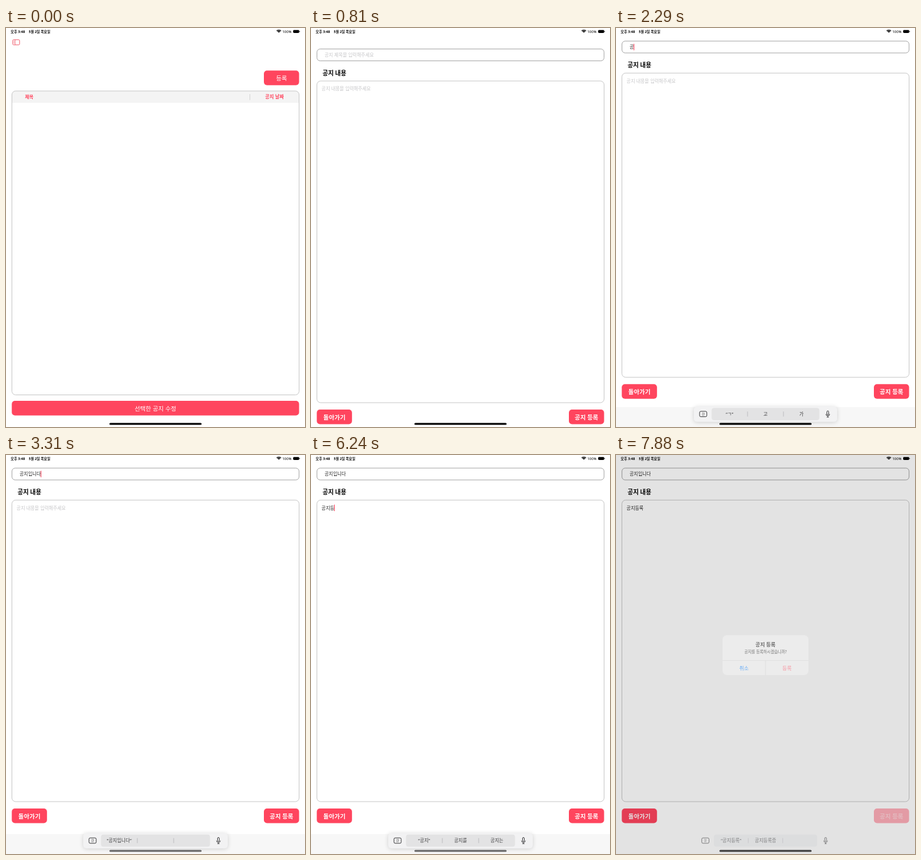
Animation, 480 px wide and 640 px high, one loop 8000 ms. Source, as an HTML page with a canvas:

```html
<!DOCTYPE html>
<html lang="ko">
<head>
<meta charset="utf-8">
<style>
  html, body { margin: 0; width: 100%; height: 100%; overflow: hidden; background: #fff; }
  canvas { display: block; }
</style>
</head>
<body>
<canvas id="stage" width="480" height="640"></canvas>
<script>
const ctx = document.getElementById('stage').getContext('2d');
const LOOP = 8000, STEP = 110, LEAD = 8;
const RED = '#ff455e', HINT = '#c6c6c8';
const FONT = '"Noto Sans", "Noto Sans CJK KR", "Noto Sans CJK", sans-serif';

const titleTyping = [[0, ''], [2080, 'ㄱ'], [2190, '고'], [2290, '공'], [2400, '공지'],
  [2510, '공지이'], [2840, '공지입'], [3000, '공지입니'], [3310, '공지입니다']];
const bodyTyping = [[0, ''], [5590, '고'], [5700, '공'], [5810, '공ㅈ'], [5930, '공지'],
  [6040, '공짇'], [6240, '공지등'], [6590, '공지등록']];
const suggestions = [[0, ''], [2290, '“ㄱ”|고|가'], [2510, '“공지”|공지를|공지는'],
  [2840, '“공지입”|공지|공지를'], [3310, '“공지입니다”'], [4920, ''], [5190, '“ㄱ”|고|가'],
  [5930, '“공지”|공지를|공지는'], [6420, '“공지등”|공지등록|공지를'], [7100, '“공지등록”|공지등록증']];
const caretAlpha = [[0, 0], [1430, 1], [3590, .5], [3710, 0], [3950, .5], [4070, 1], [4610, .5],
  [4730, 0], [4920, 1], [7100, .5], [7210, 0], [7450, .5], [7570, 1], [7880, 0]];

// Value of the last entry that has started.
const at = (t, table) => table.filter(([start]) => start <= t).pop()[1];
const held = (t, anchor) => anchor + Math.floor((t - anchor) / STEP) * STEP;
// Critically damped spring: remaining distance from 1 to 0.
const spring = (t, start) => {
  const x = Math.max(0, t - start) * .01826;
  return (1 + x) * Math.exp(-x);
};

function box(x, y, w, h, r, fill, stroke) {
  ctx.beginPath();
  ctx.roundRect(x, y, w, h, r);
  if (fill) { ctx.fillStyle = fill; ctx.fill(); }
  if (stroke) { ctx.strokeStyle = stroke; ctx.lineWidth = 1; ctx.stroke(); }
}

// y is the vertical middle of the text.
function text(str, x, y, size, color, weight = 400, align = 'left') {
  ctx.font = `${weight} ${size}px ${FONT}`;
  ctx.textAlign = align;
  ctx.fillStyle = color;
  ctx.fillText(str, x, y + size * .37);
}

function line(color, width, ...points) {
  ctx.beginPath();
  points.forEach(([x, y], i) => i ? ctx.lineTo(x, y) : ctx.moveTo(x, y));
  ctx.strokeStyle = color;
  ctx.lineWidth = width;
  ctx.stroke();
}

function faded(alpha, paint) {
  ctx.save();
  ctx.globalAlpha *= alpha;
  paint();
  ctx.restore();
}

function button(label, x, y, w, weight, alpha = 1) {
  faded(alpha, () => {
    box(x, y, w, 23.5, 5, RED);
    text(label, x + w / 2, y + 12, 9.65, '#fff', weight, 'center');
  });
}

function statusBar() {
  text('오후 3:48', 7.5, 5.5, 5.6, '#000', 600);
  text('5월 2일 목요일', 36.5, 5.5, 5.5, '#000', 600);
  text('100%', 458.5, 5.5, 5.9, '#000', 500, 'right');
  for (const r of [1.7, 3.4, 5]) {
    ctx.beginPath();
    ctx.arc(438, 8, r, -Math.PI * .75, -Math.PI * .25);
    ctx.strokeStyle = '#000';
    ctx.lineWidth = 1.2;
    ctx.stroke();
  }
  box(461, 3.2, 9.6, 4.8, 1.4, '#000');
  box(471.2, 4.8, .8, 1.6, .4, '#000');
}

function listScreen(t) {
  box(10.8, 18.8, 11, 8.2, 1.5, null, '#f0606f');
  line('#f0606f', .8, [14.6, 19], [14.6, 27]);
  for (const y of [21, 22.7, 24.4]) line('#f0606f', .6, [12, y], [13.6, y]);
  button('등록', 414, 68.3, 56.5, 400, at(t, [[0, 1], [380, .2], [490, .48]]));
  box(9.5, 101, 461, 19, [6, 6, 0, 0], '#f4f4f4');
  box(9.5, 101, 461, 487.5, 6, null, '#c8c8c8');
  text('제목', 30.5, 110.5, 7.4, RED, 700);
  line('#d4d4d4', 1, [391.5, 106], [391.5, 115.5]);
  text('공지 날짜', 431, 110.5, 7.6, RED, 700, 'center');
  button('선택한 공지 수정', 9.3, 598, 461.2, 400);
}

function input(value, hint, x, y, caret) {
  text(value || hint, x, y, 7.45, value ? '#222' : HINT);
  if (!caret) return;
  const end = value ? x + ctx.measureText(value).width : x;
  faded(caret, () => box(end - .3, y - 5.3, 1.1, 10.6, .5, RED));
}

function formScreen(t, offset, bottom) {
  const caret = at(t, caretAlpha), inBody = t >= 4920;
  ctx.save();
  ctx.translate(0, offset);
  box(0, 0, 480, 640, 0, '#fff');
  box(9.6, 21, 460.8, 19, 5, null, '#a6a6a6');
  input(at(t, titleTyping), '공지 제목을 입력해주세요', 21.7, 30.5, inBody ? 0 : caret);
  text('공지 내용', 18.5, 59.5, 9.7, '#000', 700);
  box(9.5, 72.3, 461, bottom - 72.3, 6, null, '#c8c8c8');
  input(at(t, bodyTyping), '공지 내용을 입력해주세요', 16.8, 84.8, inBody ? caret : 0);
  button('돌아가기', 9.3, bottom + 11, 56.5, 600);
  button('공지 등록', 414, bottom + 11, 56.5, 600, at(t, [[0, 1], [7770, .2], [7880, .43]]));
  ctx.restore();
}

function inputBar(t, rise, compact) {
  const closing = t >= 7880;
  const half = at(t, [[0, 120.5], [2190, 106], [2290, 100], [2400, 101], [7880, 96.5]]);
  const floating = at(t, [[0, 0], [2190, .6], [2290, 1], [7880, 0]]);
  const y = 621 + 26 * rise - 2.5 * compact;
  const inner = half - 13.5, ink = '#3c3c3e';
  if (!closing) {
    box(0, floating ? 608 : y - 7, 480, 40, 0, floating ? '#f7f7f7' : '#d2d4db');
    faded(floating, () => {
      ctx.shadowColor = 'rgba(0,0,0,.16)';
      ctx.shadowBlur = 7;
      ctx.shadowOffsetY = 1;
      box(240 - half - 15, y - 12, half * 2 + 30, 24.5, 5, '#f2f2f3');
    });
  }
  faded(closing ? .6 : 1, () => {
    box(240 - inner, y - 9.7, inner * 2, 19.5, 4, floating ? '#e3e3e4' : closing ? '#d9dadd' : '#cbced5');
    for (const x of [-inner / 3, inner / 3])
      line('#b4b4b8', .8, [240 + x, y - 4], [240 + x, y + 4]);
    at(t, suggestions).split('|').forEach((word, i) =>
      text(word, 240 + (i - 1) * inner * .667, y, 7.5, ink, 400, 'center'));
    const left = 240 - half, right = 240 + half;
    box(left - 5.8, y - 4.3, 11.6, 8.6, 2, null, ink);
    text('한', left, y, 5, ink, 500, 'center');
    box(right - 1.4, y - 5, 2.8, 6.3, 1.4, null, ink);
    ctx.beginPath();
    ctx.arc(right, y, 3, 0, Math.PI);
    ctx.stroke();
    line(ink, .9, [right, y + 3], [right, y + 5]);
    line(ink, .9, [right - 1.7, y + 5], [right + 1.7, y + 5]);
  });
}

function alertBox() {
  box(171, 289, 138, 64, 7, '#ececec');
  text('공지 등록', 240, 304, 8.2, '#6c6c6c', 600, 'center');
  text('공지를 등록하시겠습니까?', 240, 315.5, 6.3, '#747474', 400, 'center');
  line('#dcdcdc', .7, [171, 329.7], [309, 329.7]);
  line('#dcdcdc', .7, [240, 329.7], [240, 353]);
  text('취소', 205.5, 341.7, 8.1, '#66acf8', 400, 'center');
  text('등록', 274.5, 341.7, 8.1, '#f796a2', 400, 'center');
}

function draw(t) {
  const sheetTime = held(t, 380), keyboardTime = held(t, 1630);
  const rise = spring(keyboardTime, 1531), compact = 1 - spring(keyboardTime, 2150);
  const offset = 640 * spring(sheetTime, 390);
  const asking = t >= 7880;

  box(0, 0, 480, 640, 0, '#fff');
  if (t < 920) listScreen(t);
  if (offset < 640) formScreen(t, offset, 571.3 + 17 * rise - 15.3 * compact);
  statusBar();
  if (asking) box(0, 0, 480, 640, 0, 'rgba(0,0,0,.108)');
  if (rise < 1) inputBar(t, rise, compact);
  if (asking) alertBox();
  box(166, 633.4, 148, 3, 1.5, at(t, [[0, '#000'], [2400, '#666'], [7880, '#3c3c3c']]));
}

function tick(now) {
  draw((now + LEAD) % LOOP);
  requestAnimationFrame(tick);
}
requestAnimationFrame(tick);
</script>
</body>
</html>
```
